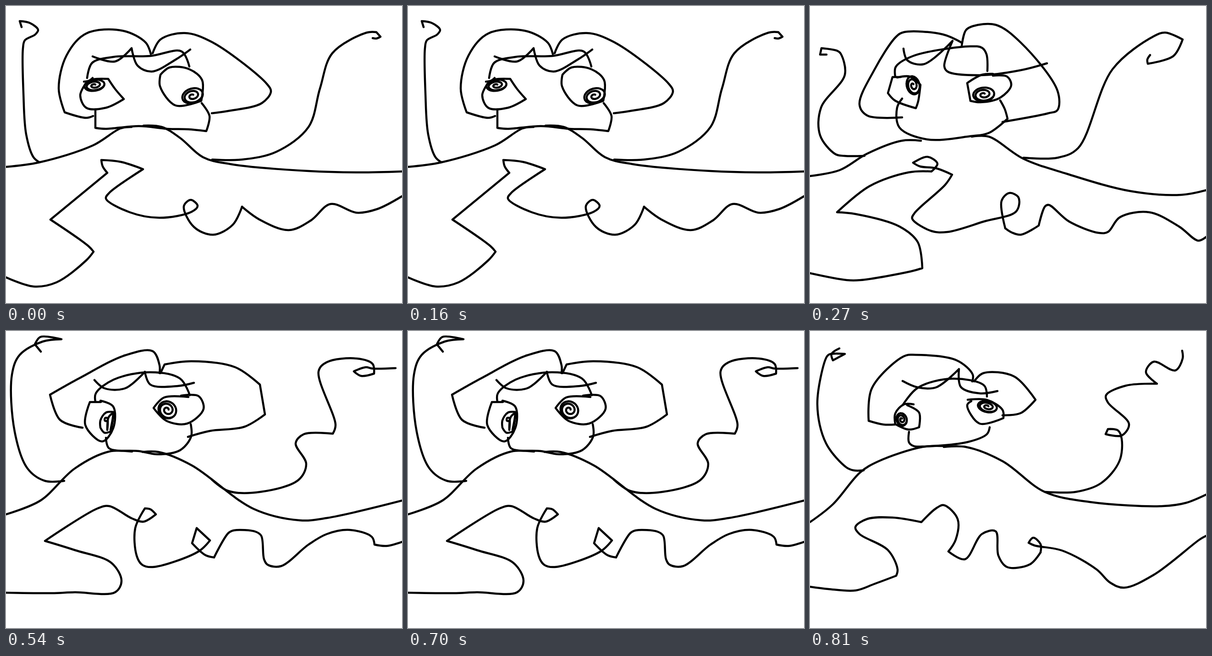
An HTML page that plays this animation: 864 by 648 pixels, repeating every 1080 ms.

```html
<!DOCTYPE html>
<html lang="en">
<head>
<meta charset="utf-8">
<title>Waving doodle</title>
<style>
  html, body { margin: 0; width: 100%; height: 100%; overflow: hidden; background: #fff; }
  svg { display: block; width: 864px; height: 648px; }
  path { fill: none; stroke: #000; stroke-width: 4.5; stroke-linecap: round; stroke-linejoin: round; }
</style>
</head>
<body>
<svg id="stage" viewBox="0 0 864 648"></svg>
<script>
const HOLD = 270;
const NS = 'http://www.w3.org/2000/svg';
const stage = document.getElementById('stage');
const groups = [];

const gap = (a, b) => Math.sqrt(Math.hypot(b[0] - a[0], b[1] - a[1])) || 1;

// Bezier handle at b for the centripetal spline running a, b, c.
function handle(a, b, c) {
  const p = gap(a, b), q = gap(b, c);
  return [0, 1].map(k => {
    const slope = (b[k] - a[k]) / p - (c[k] - a[k]) / (p + q) + (c[k] - b[k]) / q;
    return b[k] + slope * q / 3;
  });
}

function curve(pts) {
  let d = '';
  for (let i = 0; i < pts.length - 1; i++) {
    const a = pts[i], b = pts[i + 1];
    const out = i ? handle(pts[i - 1], a, b) : a;
    const into = i + 2 < pts.length ? handle(pts[i + 2], b, a) : b;
    d += `C${[...out, ...into, ...b].map(n => n.toFixed(1))}`;
  }
  return d;
}

function addPath(d) {
  const path = document.createElementNS(NS, 'path');
  path.setAttribute('d', d);
  groups[groups.length - 1].appendChild(path);
}

// One smooth stroke through the points; "/" makes the point before it a sharp corner.
function pen(text) {
  let last = null, d = '';
  for (const part of text.split(' / ')) {
    const pts = part.split(' ').map(p => p.split(',').map(Number));
    if (last) pts.unshift(last);
    else d = `M${pts[0]}`;
    d += curve(pts);
    last = pts[pts.length - 1];
  }
  addPath(d);
}

// A full oval that winds inwards.
function pupil(x, y, rx, ry, tilt = 0) {
  const pts = [];
  for (let a = 0; a <= 18; a += 0.5) {
    const r = a < 6.5 ? 1 : 1 - (a - 6.5) / 13.5;
    const u = rx * r * Math.cos(a), v = ry * r * Math.sin(a);
    pts.push([x + u * Math.cos(tilt) - v * Math.sin(tilt), y + u * Math.sin(tilt) + v * Math.cos(tilt)]);
  }
  addPath(`M${pts[0]}` + curve(pts));
}

function pose(draw) {
  groups.push(stage.appendChild(document.createElementNS(NS, 'g')));
  draw();
}

pose(() => {
  // arms
  pen('34,46 30,33 / 52,37 70,52 64,62 41,75 37,92 38,190 44,280 60,330 73,341');
  pen('450,335 515,335 590,318 660,264 685,180 712,103 787,58 808,57 / 817,67 / 808,71 800,70');
  // hair
  pen('190,240 175,244 128,232 / 115,180 132,108 175,60 255,54 305,80 316,105');
  pen('320,103 337,73 390,59 450,79 570,171 578,187 558,212 485,229 449,234');
  // face
  pen('177,157 188,124 235,111 315,109 383,99 400,132');
  pen('189,110 238,121 274,92 / 287,130 318,143 370,117 402,95');
  pen('195,228 195,266 / 218,268 290,262 352,268 398,269 437,273 / 444,240 427,212');
  // eyes
  pen('170,165 181,163 189,157');
  pen('176,166 190,160 223,159 / 238,181 257,203 / 218,222 175,222 162,195 172,172');
  pupil(193, 173, 22, 12, -0.15);
  pen('337,150 357,134 400,138 428,162 426,207 / 370,217 336,175 337,150');
  pupil(407, 196, 23, 16, -0.3);
  // body
  pen('0,351 73,341 190,304 250,267 274,264');
  pen('300,261 340,264 380,288 430,330 490,345 660,360 770,363 864,361');
  // shore
  pen('0,592 60,612 110,603 175,555 191,536 / 180,524 97,466 / 221,364 / 211,350 208,336 / 250,340 299,356 / 225,408 218,420 270,450 335,462 405,449 418,436 403,423 388,437 410,482 452,499 495,477 515,438');
  pen('515,438 555,467 617,489 665,468 708,432 765,451 810,443 864,415');
});

pose(() => {
  // arms
  pen('36,106 22,106 / 25,92 / 60,98 67,104 76,150 24,222 22,282 55,323 75,327 119,327');
  pen('466,331 540,331 585,310 660,138 750,66 775,58 813,73 / 793,109 737,126 / 736,117 742,107');
  // hair
  pen('201,243 125,239 108,215 140,140 188,67 205,57 290,62 331,80');
  pen('331,87 340,53 355,44 405,41 460,80 540,185 540,227 520,234 420,253');
  // face
  pen('186,154 187,133 225,109 350,88 375,91 385,105 387,142');
  pen('204,93 212,118 248,127 311,76 / 293,131 300,143 370,151 460,140 517,125');
  pen('201,202 190,222 195,265 255,291 350,284 390,277 431,246 / 425,225 415,206');
  // eyes
  pen('198,155 180,155 / 170,190 / 185,206 231,223 / 236,208 241,172 / 218,154 190,156');
  pupil(225, 173, 14, 20, -0.25);
  pen('399,152 430,154 439,173 415,200 372,210 350,207 / 343,168 / 375,150 399,148');
  pupil(379, 193, 23, 15, -0.1);
  // body
  pen('0,371 65,358 125,322 200,294 242,294');
  pen('353,285 390,285 465,333 560,366 700,404 810,412 864,402');
  // shore
  pen('0,583 80,598 110,598 220,579 245,572 / 235,515 195,481 100,454 59,450 / 130,393 215,363 265,361 / 278,344 256,329 225,342 / 240,350 275,354 310,368 / 295,390 228,452 223,464 265,491 300,493 380,470 450,448 455,418 435,408 418,425 426,485');
  pen('426,485 440,494 460,499 499,479 / 513,437 521,434 565,470 630,495 650,493 676,461 740,450 805,481 847,512 864,504');
});

pose(() => {
  // arms
  pen('76,45 63,29 / 75,13 121,18 / 80,23 30,52 13,95 19,220 47,300 85,327 127,327');
  pen('449,324 485,349 555,351 638,325 655,290 632,245 650,225 713,224 / 719,205 682,88 700,68 765,60 800,72 803,93 / 775,98 759,88 / 785,79 800,82 850,81');
  // hair
  pen('167,211 118,194 96,139 / 160,103 260,53 320,44 335,75 335,92');
  pen('337,92 346,73 / 405,66 500,79 554,117 / 565,182 / 520,209 445,218 397,231');
  // face
  pen('195,154 196,136 235,106 315,90 380,104 401,140');
  pen('193,107 215,125 260,125 303,89 / 315,117 375,120 410,113');
  pen('218,233 225,256 290,262 330,269 380,260 404,230 403,203');
  // eyes
  pen('207,155 183,155 / 173,205 210,241 234,212 234,165 206,152');
  pen('206,211 206,195 218,178 236,177 / 229,219 / 215,222 206,211');
  pen('221,196 216,196 216,190 221,190 221,216 / 224,188 233,180 228,216');
  pen('398,144 345,145 322,168 / 350,196 395,202 431,170 420,142 382,141');
  pupil(352, 172, 20, 18, 0.6);
  // body
  pen('0,400 75,370 150,300 225,263 275,263');
  pen('298,264 333,264 405,293 540,388 640,413 700,408 864,370');
  // shore
  pen('0,571 100,572 150,570 238,570 252,545 230,506 150,478 85,458 / 200,387 225,382 275,409 300,416 327,400 / 315,389 303,387 / 282,430 285,490 297,510 320,515 420,481 445,457 / 416,430 / 406,463 / 435,489 454,494');
  pen('454,494 485,441 497,435 545,438 557,447 563,498 571,510 600,513 660,466 700,443 750,434 798,449 804,466 / 830,469 864,460');
});

pose(() => {
  // arms
  pen('64,38 47,50 50,64 / 76,50 / 42,51 36,57 16,160 35,245 80,298 95,304 117,304');
  pen('512,351 580,351 635,332 675,284 680,235 672,217 650,214 / 645,225 / 680,228 696,203 650,156 646,140 690,119 757,115 / 733,90 750,67 797,86 813,60 812,43');
  // hair
  pen('186,204 160,204 128,196 / 135,125 205,55 230,52 320,64 355,95 354,110');
  pen('358,110 378,92 445,99 492,150 / 460,179 420,184');
  // face
  pen('202,162 235,124 310,104 380,119 386,143');
  pen('202,109 235,123 275,123 325,83 / 329,122 370,136 409,131');
  pen('216,220 216,243 226,251 245,252 345,242 386,225 392,210');
  // eyes
  pen('226,160 205,160 186,180 186,203 / 215,215 238,210 / 238,178 212,162');
  pupil(200, 193, 11, 14, -0.3);
  pen('344,150 385,150 420,172 422,190 / 370,202 343,162 352,153');
  pupil(387, 165, 21, 12, 0.2);
  // body
  pen('0,417 50,378 110,308 150,284 245,253 292,251');
  pen('292,253 340,253 420,284 512,351 610,373 770,382 820,375 864,357');
  // shore
  pen('0,558 40,563 100,566 140,552 188,534 / 191,520 170,478 108,443 99,428 125,410 180,407 243,417 / 275,387 292,380 322,410 318,455 302,481 / 338,498 375,443 405,437 411,490 430,515 480,509 503,483');
  pen('503,483 503,465 487,451 477,462 / 490,468 550,479 625,520 655,549 685,560 750,532 850,455 864,447');
});

function show() {
  const now = Math.floor(performance.now() / HOLD) % groups.length;
  groups.forEach((g, i) => { g.style.display = i === now ? '' : 'none'; });
  requestAnimationFrame(show);
}
show();
</script>
</body>
</html>
```
